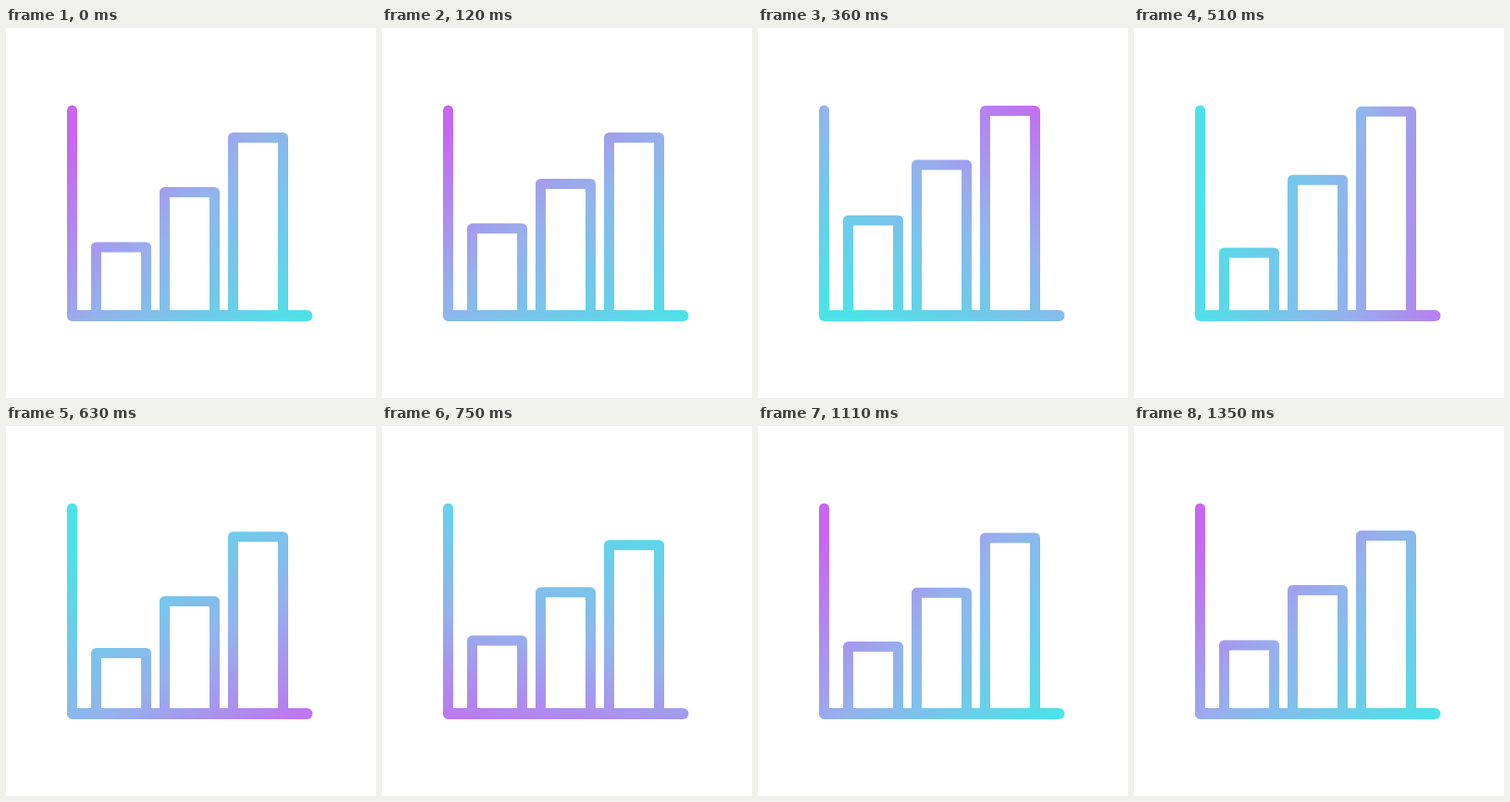
Animation, 400 px wide and 400 px high, one loop 1.44 s. Source, as an HTML page with a canvas:

```html
<!DOCTYPE html>
<html lang="en">
<head>
<meta charset="utf-8">
<title>Bar chart icon</title>
<style>
  html, body { margin: 0; width: 100%; height: 100%; overflow: hidden; background: #fff; }
  canvas { display: block; width: 100vw; height: 100vh; }
</style>
</head>
<body>
<canvas id="stage" width="400" height="400"></canvas>
<script>
const ctx = document.getElementById('stage').getContext('2d');
const LOOP = 1440, STEP = 30, SPIN_TIME = 1080;
const RISE = 250, HOLD_END = 345, SWING = 220, STAGGER = 70;
const SWINGS = [-29.5, 12, -6, 3, 0];
const BASE = 311, BAR_WIDTH = 54, BAR_TOPS = [237, 177.5, 118.5];

const easeInOut = u => (1 - Math.cos(Math.PI * u)) / 2;
const easeOut = u => Math.sin(Math.PI / 2 * u);

// A bar shoots up, holds, then drops back in shrinking swings.
function bounce(t) {
  if (t < HOLD_END) return SWINGS[0] * easeOut(Math.min(Math.max(t / RISE, 0), 1));
  const swing = (t - HOLD_END) / SWING, i = Math.floor(swing);
  if (i >= SWINGS.length - 1) return 0;
  return SWINGS[i] + (SWINGS[i + 1] - SWINGS[i]) * easeInOut(swing - i);
}

// One full turn with a soft start.
function spin(t) {
  const p = Math.min(t / SPIN_TIME, 1);
  return 2 * Math.PI * p * (1 - (1 - p) ** 3);
}

function rotatingGradient(turn) {
  const angle = turn - 138 * Math.PI / 180;
  const x = Math.cos(angle), y = Math.sin(angle);
  const cx = 216, cy = 214, ahead = 170, behind = 147;
  const g = ctx.createLinearGradient(cx + ahead * x, cy + ahead * y, cx - behind * x, cy - behind * y);
  g.addColorStop(0, 'rgb(200,102,240)');
  g.addColorStop(0.46, 'rgb(148,178,236)');
  g.addColorStop(1, 'rgb(76,226,232)');
  return g;
}

function line(width, ...points) {
  ctx.lineWidth = width;
  ctx.beginPath();
  points.forEach(([x, y]) => ctx.lineTo(x, y));
  ctx.stroke();
}

function draw(t) {
  ctx.fillStyle = '#fff';
  ctx.fillRect(0, 0, 400, 400);
  ctx.strokeStyle = rotatingGradient(spin(t));
  ctx.lineCap = ctx.lineJoin = 'round';
  line(11, [71.5, 89], [71.5, BASE]);
  line(12, [72, BASE], [325.5, BASE]);
  BAR_TOPS.forEach((top, i) => {
    const left = 97.5 + 74 * i, right = left + BAR_WIDTH;
    const y = top + bounce(t - i * STAGGER);
    line(11, [left, BASE], [left, y], [right, y], [right, BASE]);
  });
}

const start = performance.now();
function tick() {
  const t = (performance.now() - start) % LOOP;
  draw(Math.floor(t / STEP) * STEP);
  requestAnimationFrame(tick);
}
tick();
</script>
</body>
</html>
```
